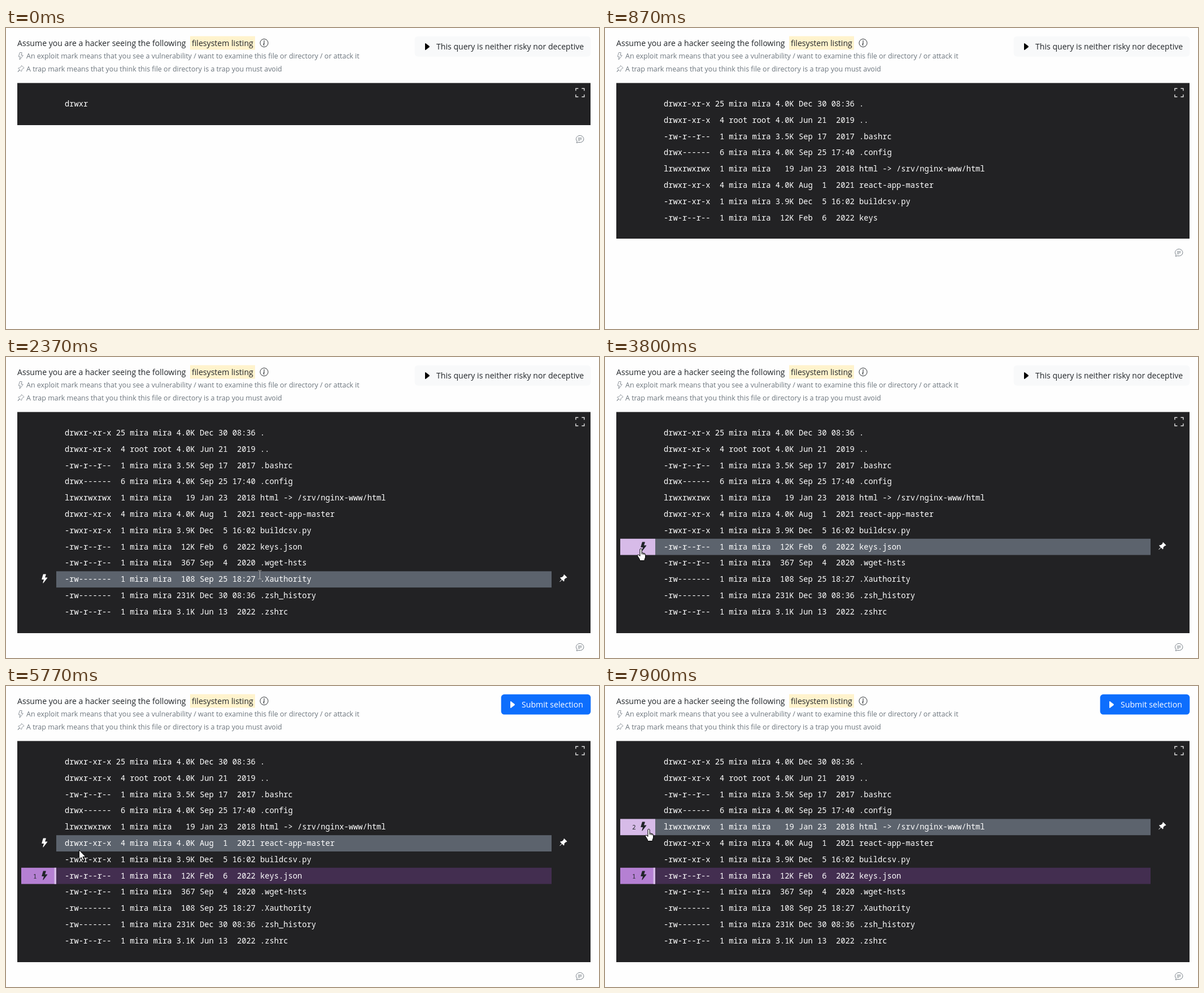
These frames come from a looping animation (1050 px wide and 533 px high, 8 s). An HTML page:

```html
<!DOCTYPE html>
<html lang="en">
<head>
<meta charset="utf-8">
<style>
html, body { margin: 0; width: 100%; height: 100%; overflow: hidden; background: #fefefe; }
svg { display: block; }
text { font: 14.1px "Open Sans", "Noto Sans", sans-serif; fill: #212529; white-space: pre; }
.small { font-size: 12.48px; fill: #6c757d; }
.mono { font: 500 13.74px "Noto Sans Mono", "DejaVu Sans Mono", monospace; fill: #fff; }
.count { font: 11px "Noto Sans Mono", monospace; fill: #212529; }
.line { fill: none; stroke: #6c757d; }
.pointer { fill: #fff; stroke: #000; stroke-linejoin: round; }
</style>
</head>
<body>
<svg width="1050" height="533" viewBox="0 0 1050 533">
  <defs>
    <path id="bolt" d="M5.52.36A.5.5 0 0 1 6 0h4a.5.5 0 0 1 .47.66L8.7 6h3.8a.5.5 0 0 1 .4.8l-7 9a.5.5 0 0 1-.88-.45L6.82 9.5H3.5a.5.5 0 0 1-.48-.64z"/>
    <path id="pin" d="M9.83.72a.5.5 0 0 1 .35.15l4.95 4.95a.5.5 0 0 1 0 .7c-.48.48-1.07.6-1.5.6l-.46-.05-3.13 3.14a6 6 0 0 1 .16 1c.04.7-.03 1.7-.72 2.38a.5.5 0 0 1-.7 0l-2.84-2.83-3.18 3.18c-.2.2-1.22.9-1.41.71-.2-.2.5-1.22.7-1.41l3.18-3.19L2.4 7.22a.5.5 0 0 1 0-.7c.69-.7 1.67-.77 2.38-.72a6 6 0 0 1 1 .16l3.14-3.14a2.8 2.8 0 0 1-.04-.46c0-.43.1-1.02.6-1.5a.5.5 0 0 1 .35-.14z"/>
  </defs>

  <rect x="326" y="14.500" width="115" height="24" fill="#fff3cd"/>
  <text x="20" y="32">Assume you are a hacker seeing the following</text>
  <text x="329" y="32">filesystem listing</text>
  <g transform="translate(449.5 19) scale(.94)" fill="#212529">
    <circle cx="8" cy="8" r="7.5" fill="none" stroke="#212529"/>
    <path d="m8.93 6.59-2.29.29-.08.38.45.08c.3.07.35.18.29.47l-.74 3.47c-.2.9.1 1.32.8 1.32.55 0 1.18-.25 1.47-.6l.09-.42c-.2.18-.5.25-.69.25-.27 0-.37-.2-.3-.53zM9 4.5a1 1 0 1 1-2 0 1 1 0 0 1 2 0z"/>
  </g>
  <use href="#bolt" class="line" transform="translate(20 43.5) scale(.78)"/>
  <text class="small" x="36" y="54">An exploit mark means that you see a vulnerability / want to examine this file or directory / or attack it</text>
  <use href="#pin" class="line" transform="translate(20 66) scale(.78)"/>
  <text class="small" x="36" y="77">A trap mark means that you think this file or directory is a trap you must avoid</text>

  <rect id="btn" y="14.800" height="35.800" rx="5.5"/>
  <path id="play" d="M0 1v10q0 1.600 1.300.7L7.500 7q1-1 0-2L1.300.3Q0-.6 0 1z"/>
  <text id="label" y="38"></text>

  <rect id="term" x="20" y="97.400" width="1015" fill="#222224"/>
  <path d="M1008.900 111.200v-4h4.500m6 0h4.500v4m0 6.600v4h-4.500m-6 0h-4.500v-4" fill="none" stroke="#fff" stroke-width="1.200"/>
  <g id="rows"></g>
  <g id="chat" class="line">
    <path d="M2.700 11.800A6.300 6 0 0 1 1 8C1 4.600 4.100 1.500 8 1.500S15 4.600 15 8s-3.100 6.200-7 6.200q-1.300 0-2.400-.4Q4 14.700 1.800 14.800 2.800 13.500 2.700 11.800z"/>
    <path d="M4.500 6h7M4.500 8.200h7M4.500 10.400h4" stroke-width=".9"/>
  </g>

  <g id="pointer">
    <path id="arrow" class="pointer" d="M0 0V16.500L3.800 13 6.300 18.600 8.800 17.500 6.400 12H11.500z"/>
    <path id="hand" class="pointer" d="M-1.600 13V1.500a1.600 1.600 0 0 1 3.200 0V7l5 1.400q1.600.7 1.500 2.600V14.500q-.2 2-1.500 4.300V21H-2V19L-5.600 13.200q-1-2 .5-2.600 1.400-.4 3.500 2.400zM1.600 7v3M4 8v2.500M6.300 8.500v2.500"/>
    <path id="beam" fill="none" stroke="#b4b4b4" d="M-3-7.500h2.500l.5.500.5-.5H3M0-7V7M-3 7.500h2.500L0 7l.5.500H3"/>
  </g>
</svg>
<script>
const LOOP = 8000, ROW = 28.8, TOP = 120;
const CLICK1 = 4570, CLICK2 = 7830;
const lines = [
  "drwxr-xr-x 25 mira mira 4.0K Dec 30 08:36 .",
  "drwxr-xr-x  4 root root 4.0K Jun 21  2019 ..",
  "-rw-r--r--  1 mira mira 3.5K Sep 17  2017 .bashrc",
  "drwx------  6 mira mira 4.0K Sep 25 17:40 .config",
  "lrwxrwxrwx  1 mira mira   19 Jan 23  2018 html -> /srv/nginx-www/html",
  "drwxr-xr-x  4 mira mira 4.0K Aug  1  2021 react-app-master",
  "-rwxr-xr-x  1 mira mira 3.9K Dec  5 16:02 buildcsv.py",
  "-rw-r--r--  1 mira mira  12K Feb  6  2022 keys.json",
  "-rw-r--r--  1 mira mira  367 Sep  4  2020 .wget-hsts",
  "-rw-------  1 mira mira  108 Sep 25 18:27 .Xauthority",
  "-rw-------  1 mira mira 231K Dec 30 08:36 .zsh_history",
  "-rw-r--r--  1 mira mira 3.1K Jun 13  2022 .zshrc"
];
const listing = lines.join("\n");

const linear = u => u, easeOut = u => u * (2 - u), smooth = u => u * u * (3 - 2 * u);
// time, x, y, easing towards this point
const path = [
  [2020, 560, 532, linear], [2370, 450, 385, linear], [2610, 328, 341, easeOut],
  [2940, 328, 341, linear], [3740, 71, 340, smooth], [3800, 63, 339, linear],
  [5390, 63, 339, linear], [6050, 170, 259, smooth], [6140, 171, 254, easeOut],
  [6360, 171, 254, linear], [6820, 77, 253, smooth], [LOOP, 77, 253, linear]
];
const typed = [[0, 5], [870, 418], [1360, listing.length]];

const $ = id => document.getElementById(id);
const set = (el, attrs) => { for (const k in attrs) el.setAttribute(k, attrs[k]); return el; };
const show = (el, on) => el.style.display = on ? "" : "none";
const mix = (a, b, u) => a + (b - a) * u;
const clamp = u => Math.min(1, Math.max(0, u));

function add(parent, tag, attrs) {
  return parent.appendChild(set(document.createElementNS("http://www.w3.org/2000/svg", tag), attrs));
}

const rows = lines.map((line, i) => {
  const g = $("rows"), y = TOP + ROW * i + .2, height = ROW;
  const mid = Math.floor(134.4 + ROW * i);
  return {
    cell: add(g, "rect", { x: 27, y, width: 62, height }),
    edge: add(g, "rect", { x: 85.5, y, width: 3.5, height, fill: "#d7bbe8" }),
    bar: add(g, "rect", { x: 89, y, width: 877, height }),
    bolt: add(g, "use", { href: "#bolt", transform: `translate(60.300 ${mid - 8.500})` }),
    pin: add(g, "use", { href: "#pin", fill: "#fff", transform: `translate(979 ${mid - 8.500}) scale(.94)` }),
    count: add(g, "text", { class: "count", x: 48, y: mid + 5 }),
    text: add(g, "text", { class: "mono", x: 104, y: mid + 5 })
  };
});

function typedCount(t) {
  for (let i = 1; i < typed.length; i++) {
    const [t0, n0] = typed[i - 1], [t1, n1] = typed[i];
    if (t < t1) return Math.floor(mix(n0, n1, (t - t0) / (t1 - t0)));
  }
  return listing.length;
}

function pointerAt(t) {
  const i = path.findIndex(p => p[0] > t);
  if (i < 1) return null;
  const [t0, x0, y0] = path[i - 1], [t1, x1, y1, ease] = path[i];
  const u = ease((t - t0) / (t1 - t0));
  return { x: mix(x0, x1, u), y: mix(y0, y1, u) };
}

function drawTerminal(t) {
  const shown = listing.slice(0, typedCount(t)).trimEnd().split("\n");
  rows.forEach((r, i) => r.text.textContent = shown[i] || "");
  const bottom = Math.round(TOP + ROW * shown.length + 23);
  set($("term"), { height: bottom - 97.4 });
  set($("chat"), { transform: `translate(1008.500 ${bottom + 17}) scale(.96)` });
}

function drawButton(t) {
  const chosen = t >= CLICK1, x = chosen ? 877 : 724;
  const u = smooth(clamp((t - CLICK1) / 240));
  const rgb = [[248, 13], [249, 110], [250, 253]].map(([a, b]) => Math.round(mix(a, b, u)));
  set($("btn"), { x: x - .3, width: 1035.6 - x, fill: `rgb(${rgb})` });
  set($("play"), { transform: `translate(${x + (chosen ? 16 : 18)} 27)`, fill: chosen ? "#fff" : "#000" });
  set($("label"), { x: x + (chosen ? 36 : 38), style: chosen ? "fill:#fff" : "" });
  $("label").textContent = chosen ? "Submit selection" : "This query is neither risky nor deceptive";
}

function drawRows(t, p) {
  const marks = { 7: t >= CLICK1 && 1, 4: t >= CLICK2 && 2 };
  const hovered = p ? Math.floor((p.y - TOP) / ROW) : -1;
  rows.forEach((r, i) => {
    const hover = i === hovered, mark = marks[i], inCell = hover && p.x < 89;
    show(r.cell, inCell || mark);
    show(r.edge, mark && !inCell);
    show(r.bar, hover || mark);
    show(r.bolt, hover || mark);
    show(r.pin, hover);
    set(r.cell, { fill: inCell ? "#d7bbe8" : "#b580d3" });
    set(r.bar, { fill: hover ? "#5c636d" : "#432e50" });
    set(r.bolt, { fill: inCell || mark ? "#212529" : "#fff" });
    r.count.textContent = mark || "";
  });
  return hovered;
}

function drawPointer(p, row) {
  show($("pointer"), p);
  if (!p) return;
  const inRow = p.y - TOP - row * ROW, line = lines[row];
  const overText = line && inRow > 5 && inRow < 23 && p.x > 104 && p.x < 104 + line.length * 8.24;
  const kind = line && p.x < 89 ? "hand" : overText ? "beam" : "arrow";
  for (const id of ["arrow", "hand", "beam"]) show($(id), id === kind);
  set($("pointer"), { transform: `translate(${Math.round(p.x) + .5} ${Math.round(p.y) + .5})` });
}

function draw(t) {
  const p = pointerAt(t);
  drawTerminal(t);
  drawButton(t);
  drawPointer(p, drawRows(t, p));
}

const start = performance.now();
function frame(now) {
  draw(Math.max(0, now - start) % LOOP);
  requestAnimationFrame(frame);
}
draw(0);
requestAnimationFrame(frame);
</script>
</body>
</html>
```
